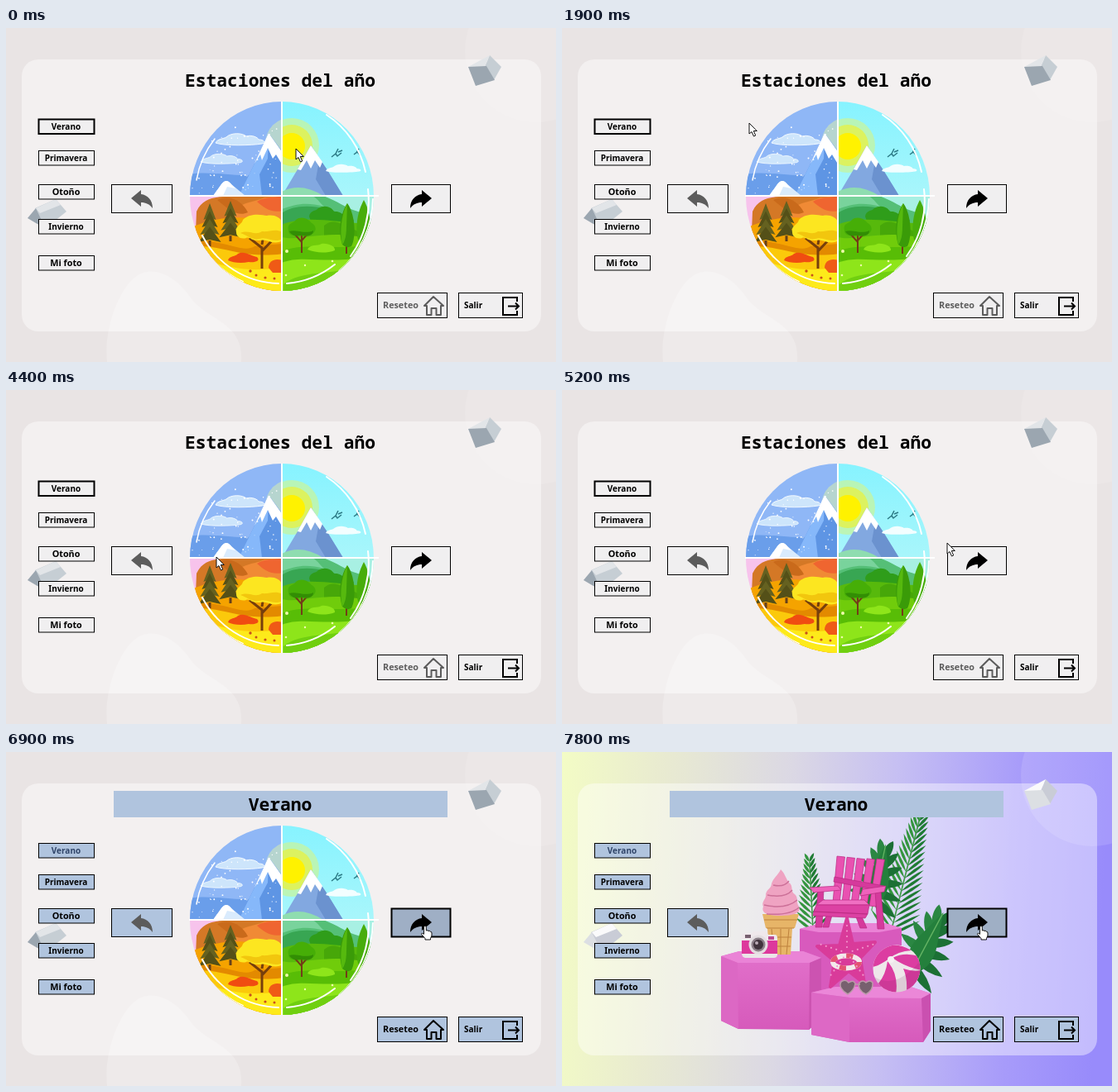
Animation of 664x404 px, one loop 8 s. Source, as an HTML page:

```html
<!DOCTYPE html>
<html lang="es">
<head>
<meta charset="utf-8">
<title>Estaciones del año</title>
<style>
html, body { margin: 0; width: 100%; height: 100%; overflow: hidden; background: #e9e4e4; }
svg { display: block; width: 664px; height: 404px; --btn: #f0eff0; --off: #5c5c5c; --reset: #5c5c5c; }
svg.blue { --btn: #b0c4de; --off: #2f4468; --reset: #000; }
.btn rect { fill: var(--btn); stroke: #000; stroke-width: 1; }
.btn text { font: bold 10px "Noto Sans", "Open Sans", sans-serif; }
.btn .w { font-size: 10.8px; }
.btn rect.focus { stroke-width: 2; }
.title { font: bold 21.3px "Noto Sans Mono", "DejaVu Sans Mono", monospace; }
.line { fill: none; stroke-width: 2; }
.blue .verano rect { stroke-width: 1; }
.blue .verano text { fill: var(--off); }
.reset text { fill: var(--reset); }
.reset path { stroke: var(--reset); }
.hover .next rect { fill: #e4e3e4; }
.blue .next rect { fill: #9fafc5; stroke-width: 2; }
.after, .summer .before, .summerOnly, .hover .arrow, .hand { display: none; }
.blue .after, .hover .hand { display: block; }
.blue .home { display: none; }
.summer .summerOnly { display: block; }
.cube { --a: #9ba6b0; --b: #c6ced4; --c: #e2e5e8; }
.summer .cube { --a: #dcdfe3; --b: #c9ccd6; --c: #fafafb; }
</style>
</head>
<body>
<svg id="stage" viewBox="0 0 664 404">
<defs>
  <linearGradient id="sky" x1="0" y1="0" x2="1" y2="0.04">
    <stop offset="0" stop-color="#f3fcc5"/><stop offset=".18" stop-color="#e9ebd0"/>
    <stop offset=".42" stop-color="#dbd8e4"/><stop offset=".62" stop-color="#c5bef3"/>
    <stop offset=".84" stop-color="#a79bfa"/><stop offset="1" stop-color="#988bfb"/>
  </linearGradient>
  <linearGradient id="dawn" x1="0" y1="0" x2="0" y2="1">
    <stop offset="0" stop-color="#86f3ff"/><stop offset="1" stop-color="#a9f6fb"/>
  </linearGradient>
  <linearGradient id="pink" x1="0" y1="0" x2="0" y2="1">
    <stop offset="0" stop-color="#e271cb"/><stop offset="1" stop-color="#d65abb"/>
  </linearGradient>
  <clipPath id="disc"><ellipse cx="333" cy="203.5" rx="111" ry="114.5"/></clipPath>
  <clipPath id="nw"><path d="M220 88H333V203H220z"/></clipPath>
  <clipPath id="ne"><path d="M333 88H450V203H333z"/></clipPath>
  <clipPath id="sw"><path d="M220 203H333V320H220z"/></clipPath>
  <clipPath id="se"><path d="M333 203H450V320H333z"/></clipPath>
  <clipPath id="ball"><circle cx="404" cy="262" r="28.5"/></clipPath>
  <path id="bend" d="M514 206L502 196V201C494 202 488 208 488 218C492 213 496 211 502 211V216z"/>
  <path id="cloud" d="M-29 4C-27-1-19-1-16-3C-10-9 4-8 8-4C14-6 22-3 23 0C30 0 32 4 27 5C15 7-18 8-29 4z"/>
</defs>

<rect width="664" height="404" fill="#e9e4e4"/>
<rect class="summerOnly" width="664" height="404" fill="url(#sky)"/>
<circle cx="640" cy="28" r="86" fill="#fff" opacity=".12"/>
<rect x="19" y="38" width="627" height="329" rx="20" fill="#fff" opacity=".42"/>
<path class="before" d="M122 404C118 370 132 322 155 302C176 285 204 299 222 325C242 354 288 355 284 404z" fill="#fff" opacity=".22"/>

<g class="cube">
  <path fill="var(--b)" d="M584 33L598 47L589 63L577 49z"/>
  <path fill="var(--c)" d="M558 47L584 33L577 49z"/>
  <path fill="var(--a)" d="M558 47L580 46L590 63L567 70z"/>
  <path fill="var(--b)" d="M35 218L60 207L73 222L48 242z"/>
  <path fill="var(--a)" d="M26 230L36 218L48 243z"/>
  <path fill="var(--c)" d="M36 218L60 207L66 214L41 224z"/>
</g>

<g class="before">
<g clip-path="url(#disc)">
  <g clip-path="url(#nw)">
    <path fill="#8fb7f6" d="M220 88H334V204H220z"/>
    <path fill="#6a9eea" d="M220 177C250 172 270 181 334 178V204H220z"/>
    <g fill="#cde5fb" stroke="#f2f9ff" stroke-width="1">
      <use href="#cloud" x="282" y="135"/><use href="#cloud" transform="translate(260 158.500) scale(.85)"/>
    </g>
    <circle cx="345" cy="140" r="32" fill="#d8eeb0" opacity=".55"/>
    <path fill="#5e95e4" d="M281 203L302 160L317 127L334 150V203z"/>
    <path fill="#86b8fa" d="M281 203L302 160L317 127L316 158L306 177L309 203z"/>
    <path fill="#fff" d="M317 127L334 151V166L326 153L322 158L316 145L309 160L307 153L300 164z"/>
    <path fill="#d9ebfd" d="M250 203L260 189Q266 181 272 189L289 203z"/>
    <path fill="#fff" d="M250 203L260 189Q266 181 272 189L277 194L267 192L262 203z"/>
    <g id="snow" fill="#fff"></g>
  </g>
  <g clip-path="url(#ne)">
    <path fill="url(#dawn)" d="M332 88H450V204H332z"/>
    <circle cx="345" cy="142" r="33" fill="#c4f5a6" opacity=".8"/>
    <circle cx="345" cy="142" r="25" fill="#dcf25f"/>
    <circle cx="345" cy="143" r="16" fill="#fff200"/>
    <path fill="#82a8e0" d="M333 203L352 171L368 142L388 172L407 203z"/>
    <path fill="#6b92cf" d="M368 142L388 172L407 203H386L374 183L377 166z"/>
    <path fill="#fff" d="M368 142L382 162L379 169L373 160L368 170L363 160L356 172L352 171z"/>
    <path fill="#8fddb0" d="M333 198Q356 186 383 203H333z"/>
    <use href="#cloud" transform="translate(407 170) scale(.72)" fill="#f2feff"/>
    <g class="line" stroke="#2c7b86" style="stroke-width:1.500">
      <path d="M393 156l5-4 2 3 5-4M398 152l3-6M401 150l5-2M420 153l4-3 4 4M423 151l3-5"/>
    </g>
  </g>
  <g clip-path="url(#sw)">
    <path fill="#f7c3ec" d="M220 203H334V320H220z"/>
    <path fill="#d47826" d="M230 222C238 204 256 205 268 203H334V320H226z"/>
    <path fill="#f08a35" d="M268 229C284 208 298 212 312 205L334 203V250H258z"/>
    <path fill="#ef6530" d="M303 210C314 203 324 206 334 203V221C320 224 312 218 303 210z"/>
    <path fill="#c96a1b" d="M255 208C270 200 286 210 292 223C280 229 268 219 255 208z"/>
    <path fill="#f5a300" d="M220 243C254 226 292 226 334 236V320H220z"/>
    <path fill="#e38a00" d="M220 258C255 252 286 274 300 264L334 261V280H220z"/>
    <path fill="#fbc90b" d="M220 267C250 256 280 281 334 273V320H220z"/>
    <path fill="#fdea1a" d="M220 280C252 279 276 300 334 289V320H220z"/>
    <g id="pines"></g>
    <path fill="#f04c11" d="M268 281C270 275 277 277 280 273C288 269 296 276 303 277C308 282 300 284 293 283C284 285 274 284 268 281z"/>
    <path fill="#ef5a16" d="M317 290C317 281 325 278 334 281V296H322z"/>
    <path class="line" stroke="#763f0c" d="M309 291V266L294 254M309 270L325 253M309 262L311 250" style="stroke-width:3"/>
    <path fill="#fce620" d="M278 247C276 239 285 238 286 232C295 223 309 226 315 227C326 225 334 231 334 239V257C323 264 315 254 306 257C297 258 294 252 290 254C283 256 278 252 278 247z"/>
    <path fill="#f2c60e" d="M283 248C293 243 300 252 309 246C318 247 325 242 334 247V255C322 261 316 252 306 255C297 257 292 251 283 248z"/>
    <g fill="#c8501c"><circle cx="295" cy="294" r="1.700"/><circle cx="302" cy="299" r="1.500"/><circle cx="313" cy="302" r="1.600"/><circle cx="324" cy="303" r="1.500"/></g>
  </g>
  <g clip-path="url(#se)">
    <path fill="#a8f0e3" d="M333 203H450V320H333z"/>
    <path fill="#55bf77" d="M333 203H383C400 209 410 218 425 222L450 235V320H333z"/>
    <path fill="#79d39c" d="M333 203H370C377 207 379 212 384 216C362 210 350 213 333 219z"/>
    <path fill="#38a653" d="M333 224C350 211 386 213 420 232V250H333z"/>
    <path fill="#2f9d1a" d="M366 228C367 220 374 222 377 218C387 212 395 219 396 222C408 221 412 232 407 239H370z"/>
    <path fill="#57b90c" d="M333 238C359 227 390 233 450 239V320H333z"/>
    <path fill="#47a709" d="M384 239C396 229 405 238 425 246V263H384z"/>
    <path fill="#70cc0b" d="M333 253C360 259 389 240 450 258V320H333z"/>
    <path fill="#58bd06" d="M333 270C364 258 391 271 450 261V288C400 278 372 294 333 284z"/>
    <path fill="#8ee51a" d="M333 284C360 273 390 289 450 273V320H333z"/>
    <path fill="#70cf10" d="M335 310C360 291 388 302 440 284V320H335z"/>
    <path fill="#8ee51a" d="M364 268C367 261 376 264 381 261C389 260 398 264 397 269C386 273 374 272 364 268z"/>
    <path class="line" stroke="#733d18" d="M357 272V248M357 259L349 250M357 257L365 248"/>
    <path fill="#46ae07" d="M341 245C339 235 347 237 350 232C358 226 366 232 369 236C377 240 374 250 366 250C360 254 354 249 349 251C344 251 341 249 341 245z"/>
    <path fill="#328e04" d="M342 246C350 243 361 250 371 245C371 252 363 252 357 251C350 252 346 252 342 246z"/>
    <g class="line" stroke="#733d18"><path d="M411 273V254M431 264V240"/></g>
    <path fill="#3a9b08" d="M412 212C420 222 424 250 417 264Q411 267 406 262C400 243 405 222 412 212z"/>
    <path fill="#56b90e" d="M412 212C406 223 402 245 406 262Q411 256 411 240z"/>
    <path fill="#48ad0b" d="M432 208C440 222 443 246 437 258Q430 262 425 256C421 239 425 221 432 208z"/>
    <g fill="#effbac"><circle cx="339" cy="270" r="2"/><circle cx="338" cy="299" r="1.300"/><circle cx="361" cy="287" r="1.200"/><circle cx="394" cy="282" r="1.300"/></g>
  </g>
  <g class="line" stroke="#fff" stroke-linecap="round">
    <path d="M230 184A107 110 0 0 1 252 134" style="stroke-width:1.500"/>
    <path d="M387 105A108 110 0 0 1 434 174" />
    <path d="M437 195A108 111 0 0 1 416 276M443 207A113 115 0 0 1 402 294" />
    <path d="M237 251A106 107 0 0 0 329 309M240 268A106 110 0 0 0 286 307M397 286A108 108 0 0 1 339 309" />
  </g>
</g>
<path d="M333 89V318M221 203H450" class="line" stroke="#fff"/>
</g>

<g class="summerOnly">
  <g id="leaves"></g>
  <path fill="#d85abd" d="M287 214L313 207H390L410 213V292H287z"/>
  <path fill="#ea82d5" d="M287 214L313 207H390L410 213L383 218H310z"/>
  <path fill="url(#pink)" d="M192 247L214 241H291L313 249V322L298 336L213 335L192 325z"/>
  <path fill="#ea83d6" d="M192 247L214 241H291L313 249L299 255H212z"/>
  <path fill="#cc53b1" d="M299 255L313 249V322L298 336z"/>
  <path fill="#dc68c4" d="M192 247L212 255L213 335L192 325z"/>

  <g stroke="#b92a82" stroke-width=".7">
    <g id="slats" fill="#e951b1"></g>
    <path fill="#d53a9c" d="M329 151L389 162L388 168L328 157zM309 165H316L314 212H306zM378 168H385L389 214H381zM320 194H327L322 212H315zM354 197H361L368 213H360z"/>
    <path fill="#ee62bb" d="M299 164L333 162L337 167L304 170zM363 166L391 162L389 169L360 174z"/>
    <path fill="#f06fc2" d="M315 179H365L371 185H307z"/>
    <path fill="#dc41a3" d="M307 185H371L369 196L304 193zM304 193L369 196L366 201L303 198z"/>
  </g>

  <path fill="#e7b568" d="M242 196H286L281 213H278L276 245H250L248 213H246z"/>
  <path class="line" stroke="#bd813d" style="stroke-width:1" d="M244 203H284M247 213H280M253 214L256 245M264 214V245M274 214L271 245M249 224H277M250 235H276"/>
  <path fill="#efa3c2" d="M264 142C270 148 270 153 274 158C280 162 275 168 281 172C286 177 282 181 286 187C289 195 280 198 265 198C248 198 240 195 243 187C240 181 247 178 246 172C247 166 253 165 253 159C256 151 261 149 264 142z"/>
  <path class="line" stroke="#cc7098" style="stroke-width:1.500" d="M255 161Q268 164 274 156M248 173Q270 177 278 167M244 185Q270 191 284 179M247 196Q275 198 286 188"/>

  <path fill="#efe8eb" d="M217 222Q217 219 221 219H229L232 217H246L249 221H257Q260 221 260 225V231H217z"/>
  <path fill="#dd399c" d="M217 228H260V244Q260 247 257 247H220Q217 247 217 244z"/>
  <path fill="#ebe5e8" d="M217 244H260V246Q259 249 256 249H221Q217 248 217 244z"/>
  <rect x="221" y="221" width="7" height="4" fill="#76606f"/><rect x="249" y="223" width="7" height="4" fill="#bc4b92"/>
  <circle cx="237" cy="233" r="11.500" fill="#e4dee1"/><circle cx="237" cy="233" r="8.500" fill="#8c8089"/>
  <circle cx="237" cy="233" r="6" fill="#41343d"/><circle cx="235" cy="231" r="2" fill="#b9aab5"/>

  <path fill="url(#pink)" d="M301 291L330 284H421L445 292V337L436 351H347L301 342z"/>
  <path fill="#eb87d8" d="M301 291L330 284H421L445 292L434 298L347 297z"/>
  <path fill="#dd68c5" d="M301 291L347 297V351L301 342z"/>
  <path fill="#ca50b0" d="M434 298L445 292V337L436 351z"/>

  <g clip-path="url(#ball)">
    <path fill="#eee7ea" d="M374 232H434V292H374z"/>
    <path fill="#dc3da1" d="M386 238Q402 228 422 240Q405 241 395 250Q382 259 375 260Q374 246 386 238zM399 249Q414 241 434 248V264Q414 260 399 249zM393 253Q407 270 403 293Q385 292 382 280Q391 269 393 253zM412 262Q424 266 433 264Q430 282 416 289Q417 273 412 262z"/>
    <circle cx="397" cy="251" r="4" fill="#f6f0f3"/>
    <path fill="#72245c" opacity=".14" d="M374 270Q402 290 433 252V294H374z"/>
  </g>

  <path fill="#d93b9a" stroke="#d93b9a" stroke-width="4" stroke-linejoin="round" d="M344 201L351 232L378 230L360 249L365 280L346 265L324 284L329 253L308 235L335 234z"/>
  <ellipse cx="343" cy="254" rx="16" ry="7.500" class="line" stroke="#f3e9eb" style="stroke-width:6"/>
  <ellipse cx="343" cy="254" rx="16" ry="7.500" class="line" stroke="#e35273" stroke-dasharray="8 11" style="stroke-width:6"/>
  <g id="dots" fill="#f294cc"></g>
  <g fill="#77606e" stroke="#bc9aa9" stroke-width="1.500">
    <path d="M345 293C338 289 334 283 337 278Q342 274 346 279Q352 275 354 280Q353 288 345 293zM367 293C360 290 357 284 359 279Q363 275 367 279Q372 275 375 279Q376 288 367 293zM353 281H360"/>
  </g>
</g>

<rect class="after" x="130" y="47" width="403" height="32" fill="#b0c4de"/>
<text class="title home" x="331" y="71" text-anchor="middle">Estaciones del año</text>
<text class="title after" x="331" y="71" text-anchor="middle">Verano</text>

<g id="menu"></g>
<g class="btn"><rect x="127.500" y="189.500" width="73" height="34"/><use href="#bend" transform="translate(665) scale(-1 1)" fill="#5c5c5c"/></g>
<g class="btn next"><rect x="465.500" y="189.500" width="71" height="34"/><use href="#bend"/></g>
<g class="btn reset"><rect x="448.500" y="320.500" width="84" height="30"/><text class="w" x="455" y="339">Reseteo</text>
  <path class="line" d="M508 336H505L516 325L528 336H525V347H519.500V339H513.500V347H508z" stroke-linejoin="round"/></g>
<g class="btn"><rect x="546.500" y="320.500" width="77" height="30"/><text x="553" y="339">Salir</text>
  <path class="line" stroke="#000" d="M617 331V326H600V347H617V342M606 336.500H619M615 332.500L619 336.500L615 340.500"/></g>

<g id="cursor">
  <path class="arrow" fill="#fff" stroke="#111" stroke-width="1" d="M0 0V13L3 10.500L5.500 16L7.700 15L5.300 9.500H9.300z"/>
  <path class="hand" fill="#fff" stroke="#111" stroke-width="1" stroke-linejoin="round" d="M2.500 8V1.500Q4-.8 5.300 1.500V6L7 5.700L8 6.500L9.500 6.300L10.300 7.300Q12 7 12 9V12L10.500 15.500V17H4V15.500L-.5 10.500Q-.5 8.300 2.500 10.300z"/>
</g>
</svg>
<script>
const $ = id => document.getElementById(id);
const stage = $("stage");
let seed = 7;
const rnd = () => (seed = seed * 16807 % 2147483647) / 2147483647;
const repeat = (n, f) => Array.from({ length: n }, (_, i) => f(i)).join("");

$("menu").innerHTML = [["Verano", 110], ["Primavera", 148], ["Otoño", 189], ["Invierno", 231], ["Mi foto", 275]]
  .map(([label, y], i) => `<g class="btn ${i ? "" : "verano"}">
    <rect ${i ? "" : 'class="focus"'} x="39.5" y="${y + .5}" width="67" height="17.5"/>
    <text class="${label.length > 5 && i < 4 ? "" : "w"}" x="72.5" y="${y + 13}" text-anchor="middle">${label}</text></g>`).join("");

$("snow").innerHTML = repeat(75, () =>
  `<circle cx="${225 + rnd() * 106}" cy="${120 + rnd() * 80}" r="${.4 + rnd() * .6}"/>`);

const pine = (x, y, h, w) => repeat(4, i => {
  const top = y + i * h * .19, half = w * (.28 + i * .075), low = y + h * (.4 + i * .18);
  return `<path fill="${i % 2 ? "#545018" : "#656120"}" d="M${x} ${top}L${x + half} ${low}L${x} ${low - 3}L${x - half} ${low}z"/>`;
}) + `<path fill="#66401a" d="M${x - 1.5} ${y + h * .9}h3v${h * .14}h-3z"/>`;
$("pines").innerHTML = pine(246, 212, 50, 27) + pine(271, 209, 47, 27);

// Palm frond from base to tip with paired leaflets
function frond(x0, y0, x1, y1, n, len) {
  const turn = Math.atan2(y1 - y0, x1 - x0) * 180 / Math.PI;
  return `<path d="M${x0} ${y0}L${x1} ${y1}" stroke="#3f9a46" stroke-width="1.6"/>` + repeat(n * 2, i => {
    const k = (i >> 1) / (n - 1), l = len * (1 - k * .55), a = turn + (i % 2 ? 1 : -1) * (50 - 22 * k);
    return `<path fill="${i % 2 ? "#1f7b33" : "#34953f"}" transform="translate(${x0 + (x1 - x0) * k} ${y0 + (y1 - y0) * k}) rotate(${a})" d="M0 0Q${l / 2}-4 ${l} 0Q${l / 2} 3 0 0z"/>`;
  });
}

// Split leaf: lobes fanned around a midrib
function splitLeaf(x, y, turn, s) {
  const lobes = repeat(12, i => {
    const side = i % 2 ? 1 : -1, k = i >> 1;
    return `<path fill="${side > 0 ? "#1c7035" : "#2b8743"}" transform="translate(0 ${26 - k * 12}) rotate(${side * (118 - k * 20)})" d="M-5 0Q-9-22 0-${42 - k * 2}Q9-22 5 0z"/>`;
  });
  return `<g transform="translate(${x} ${y}) rotate(${turn}) scale(${s})">${lobes}
    <path fill="#24803c" d="M0 36Q-24 18-13-16L0-58L13-16Q24 18 0 36z"/>
    <path d="M0 42V-56" stroke="#65b464" stroke-width="1.6"/></g>`;
}
$("leaves").innerHTML = frond(396, 222, 433, 76, 20, 40) + frond(303, 216, 299, 133, 13, 27)
  + splitLeaf(381, 158, 12, .82) + splitLeaf(436, 240, 28, .9);

$("slats").innerHTML = repeat(5, i => {
  const x = 332 + i * 12, y = 127 + Math.abs(i - 2) * -.5 + i * .8;
  return `<path d="M${x} ${y}L${x + 9.5} ${y + 1}L${x + 3 - i} ${183 + i}L${x - 5 - i} ${182 + i}z"/>`;
});

$("dots").innerHTML = repeat(25, i => {
  const a = (i % 5) * 1.2566 - 1.571, r = 7 + (i / 5 | 0) * 6.5;
  return `<circle cx="${344 + Math.cos(a) * r}" cy="${243 + Math.sin(a) * r}" r="1.1"/>`;
});

// time, x, y
const path = [[0, 350, 146], [300, 350, 146], [400, 336, 140], [500, 325, 138], [600, 325, 138], [800, 314, 130],
  [900, 314, 130], [1100, 337, 160], [1600, 337, 160], [1900, 226, 115], [2100, 185, 118], [2400, 161, 160],
  [2900, 161, 160], [3600, 161, 168], [4300, 161, 168], [4400, 254, 202], [5200, 465, 185], [5500, 502, 210], [8000, 502, 210]];

function draw(now) {
  const t = Math.floor((now % 8000) / 100) * 100;
  const i = path.findIndex(p => p[0] > t), a = path[i - 1], b = path[i];
  const k = (t - a[0]) / (b[0] - a[0]);
  $("cursor").setAttribute("transform", `translate(${a[1] + (b[1] - a[1]) * k} ${a[2] + (b[2] - a[2]) * k})`);
  stage.setAttribute("class", (t >= 5500 ? "hover " : "") + (t >= 6900 ? "blue " : "") + (t >= 7000 ? "summer" : ""));
}
const start = performance.now();
function tick() {
  draw(performance.now() - start);
  requestAnimationFrame(tick);
}
draw(0);
requestAnimationFrame(tick);
</script>
</body>
</html>
```
